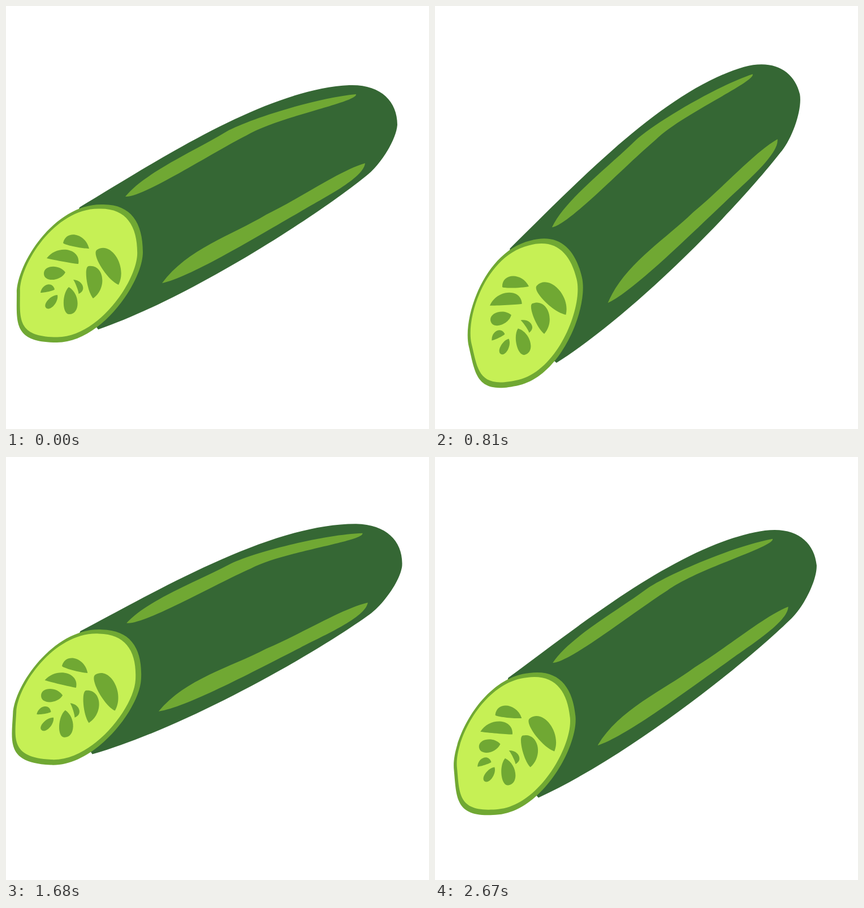
Animation of 748x748 px, one loop 2700 ms. Source, as an HTML page:

```html
<!DOCTYPE html>
<html lang="en">
<head>
<meta charset="utf-8">
<title>Cucumber</title>
<style>
  html, body { margin: 0; width: 100%; height: 100%; overflow: hidden; background: #fff; }
  svg { display: block; width: 100%; height: 100%; }
  .skin { fill: #356734; }
  .green { fill: #70a833; }
  .flesh { fill: #c6f055; }
</style>
</head>
<body>
<svg viewBox="0 0 748 748">
  <defs>
    <path id="slice" d="M168,351 C220,349 242,382 242,435 S168,595 90,595 S19,560 19,508 S85,351 168,351Z"/>
  </defs>
  <g id="cucumber">
    <path class="skin" d="M130,356 C270,272 460,147 607,140 C662,138 692,168 692,210
      C690,238 660,284 635,302 C540,378 322,517 163,572 L90,470Z"/>
    <path class="green" d="M211,337 C245,295 330,258 390,222 C430,200 550,162 619,156
      C622,170 480,196 425,229 C360,262 240,340 211,337Z"/>
    <path class="green" d="M276,490 C320,430 400,405 460,369 C520,340 590,291 635,278
      C632,305 560,340 520,364 C440,410 325,480 276,490Z"/>
    <use href="#slice" class="green"/>
    <use href="#slice" class="flesh" transform="translate(7.1 32.1) scale(.93)"/>
    <path id="seeds" class="green"/>
  </g>
</svg>
<script>
const LOOP = 2700, STEP = 30, CENTER = 374;

// A seed runs from a pointed tip to a blunt end, with a bulge on each side.
function seed([x, y, endX, endY, right, left]) {
  const ax = endX - x, ay = endY - y, len = Math.hypot(ax, ay);
  const at = (along, side) =>
    `${(x + ax * along - ay / len * side).toFixed(1)},${(y + ay * along + ax / len * side).toFixed(1)} `;
  return 'M' + at(0, 0) + 'C' + at(.25, right) + at(1, right) + at(1, 0)
    + 'C' + at(1, -left) + at(.25, -left) + at(0, 0) + 'Z';
}

// tip, end, right bulge, left bulge
const seeds = [
  [147, 429, 101, 419, 25, 3],
  [72, 446, 128, 456, 1, 28],
  [105, 471, 67, 474, 16, 15],
  [61, 507, 86, 501, 2, 15],
  [91, 511, 71, 534, 9, 10],
  [111, 497, 112, 545, 13, 20],
  [119, 484, 128, 509, -2, 16],
  [154, 517, 146, 460, 28, 9],
  [199, 493, 161, 431, 30, 13]
];
document.getElementById('seeds').setAttribute('d', seeds.map(seed).join(''));

// Each pose is an angle and a vertical shift; the poses repeat in turn.
const poses = [[0, 0], [5, -56], [-20, 41]];
const times = [0, 451, 938, 1376, 1866, 2336, 2796];

function poseAt(t) {
  const i = times.findIndex(k => k > t);
  const s = (t - times[i - 1]) / (times[i] - times[i - 1]);
  const from = poses[(i - 1) % 3], to = poses[i % 3];
  return from.map((v, j) => v + (to[j] - v) * s);
}

const cucumber = document.getElementById('cucumber');
const start = performance.now();
function draw(now) {
  const t = Math.floor(Math.max(0, now - start) % LOOP / STEP) * STEP;
  const [angle, shift] = poseAt(t);
  cucumber.setAttribute('transform', `translate(0 ${shift}) rotate(${angle} ${CENTER} ${CENTER})`);
  requestAnimationFrame(draw);
}
draw(start);
</script>
</body>
</html>
```
